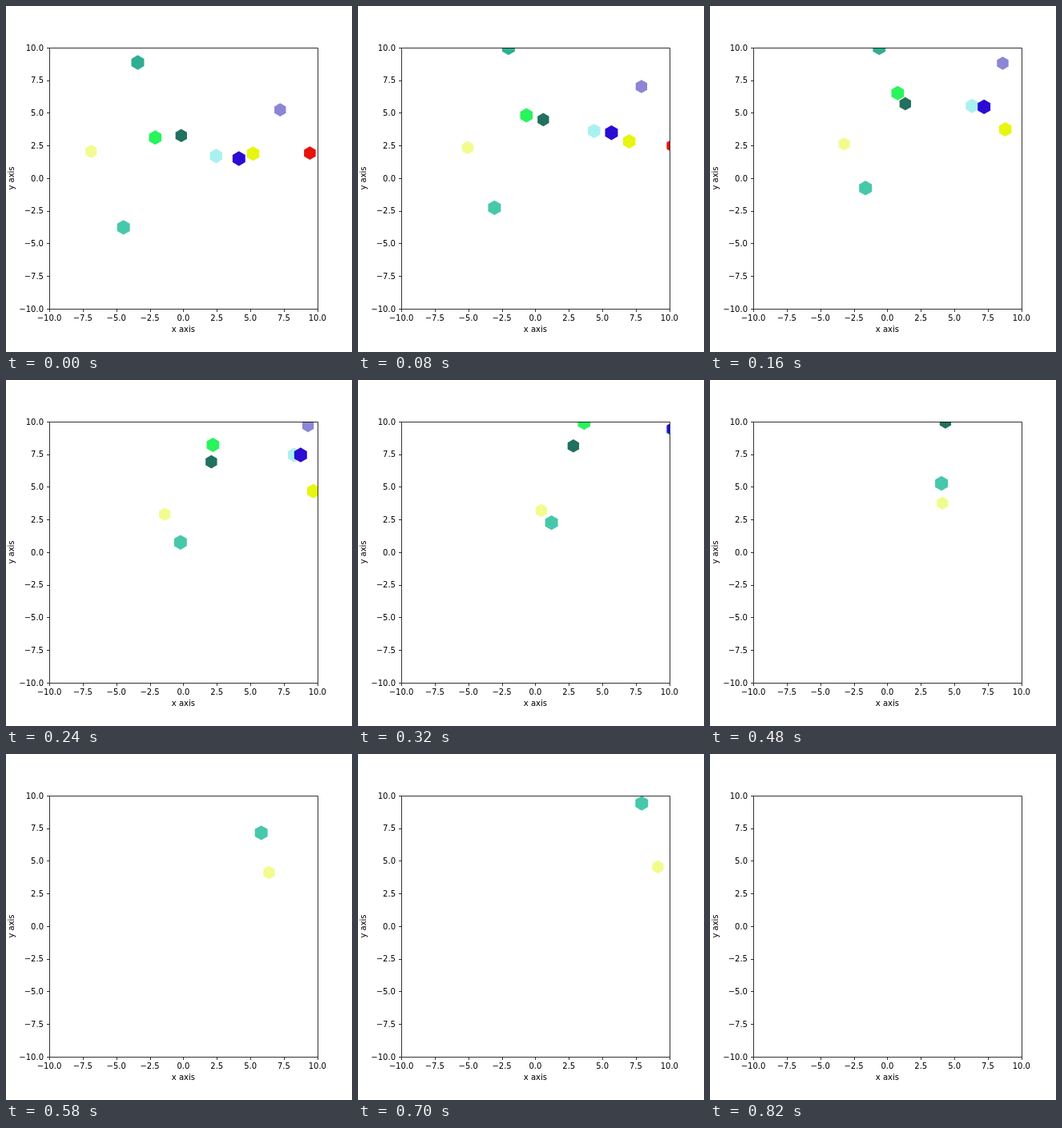
Animation, 432 px wide and 432 px high, one loop 2 s. Source, as an HTML page:

```html
<!DOCTYPE html>
<html>
<head>
<meta charset="utf-8">
<style>
  html, body { margin: 0; width: 100%; height: 100%; overflow: hidden; background: #fff; }
  svg { display: block; }
  text { font: 10px "DejaVu Sans", sans-serif; }
  path { fill: none; stroke: #000; stroke-width: .8; }
</style>
</head>
<body>
<svg id="plot" width="432" height="432" viewBox="0 0 432 432">
  <clipPath id="area"><rect x="54" y="52" width="335" height="326"/></clipPath>
  <g id="dots" clip-path="url(#area)"></g>
  <path d="M54.5 52.5H389.5V378.5H54.5Z"/>
  <g id="axes"></g>
</svg>
<script>
const LEFT = 54, RIGHT = 388.8, TOP = 51.84, BOTTOM = 378;
const STEP = 20, LOOP = 2000, LINGER = 4;

// x, y, velocity per step, radius, colour, steps shown after leaving the area
const particles = [
  [164.5, 70.5, 5.85, -4.6, 9.2, '#2fae91'],
  [342.3, 129.6, 2.9, -7.27, 8.3, '#8b86d6'],
  [186.3, 164.3, 6, -6.94, 9, '#28f45c', 3],
  [218.8, 161.8, 3.13, -4.97, 8.3, '#22705f'],
  [262.3, 187.2, 8.12, -7.8, 9, '#a9f1f0'],
  [290.8, 190.5, 6.42, -8.08, 9.2, '#2a0cd2'],
  [308.5, 184.3, 7.53, -3.8, 9, '#e6f610'],
  [379.4, 183.6, 6.65, -2.3, 8.4, '#e8120b'],
  [146.7, 276.4, 5.93, -6.14, 9.2, '#47c8ab'],
  [106.3, 181.5, 7.66, -1.157, 8.2, '#f2fb8d'],
];

function add(parent, tag, attrs, content = '') {
  const el = document.createElementNS('http://www.w3.org/2000/svg', tag);
  for (const key in attrs) el.setAttribute(key, attrs[key]);
  el.textContent = content;
  return parent.appendChild(el);
}

function drawAxes() {
  const axes = document.getElementById('axes');
  const label = (x, y, anchor, text, more) =>
    add(axes, 'text', { x, y, 'text-anchor': anchor, ...more }, text);
  for (let i = 0; i <= 8; i++) {
    const x = LEFT + (RIGHT - LEFT) * i / 8;
    const y = BOTTOM + (TOP - BOTTOM) * i / 8;
    const text = (i * 2.5 - 10).toFixed(1).replace('-', '\u2212');
    add(axes, 'path', { d: `M${Math.round(x) + .5} 378.5v3.5M54.5 ${Math.round(y) + .5}h-3.5` });
    label(x, 392.6, 'middle', text);
    label(47, y + 3.8, 'end', text);
  }
  label(221.4, 407, 'middle', 'x axis');
  label(0, 0, 'middle', 'y axis', { transform: 'translate(9.5 215) rotate(-90)' });
}

function hexagon(r) {
  return Array.from({ length: 6 }, (_, i) => {
    const a = i * Math.PI / 3;
    return `${r * Math.sin(a)},${r * Math.cos(a)}`;
  }).join(' ');
}

const exitStep = (p, v, limit) => Math.floor((limit - p) / v) + 1;

// Straight motion up to the wall, then the velocity flips on every step.
function travel(p, v, exit, step) {
  return p + v * (step < exit ? step : exit - (step - exit) % 2);
}

drawAxes();
const dots = particles.map(([x, y, vx, vy, r, fill, linger = LINGER]) => {
  const el = add(document.getElementById('dots'), 'polygon', { points: hexagon(r), fill });
  const exitX = exitStep(x, vx, RIGHT), exitY = exitStep(y, vy, TOP);
  const end = Math.min(exitX, exitY) + linger;
  return step => {
    el.setAttribute('visibility', step < end ? 'visible' : 'hidden');
    el.setAttribute('transform',
      `translate(${travel(x, vx, exitX, step)} ${travel(y, vy, exitY, step)})`);
  };
});

function frame() {
  const step = Math.floor(performance.now() % LOOP / STEP);
  dots.forEach(move => move(step));
  requestAnimationFrame(frame);
}
frame();
</script>
</body>
</html>
```
